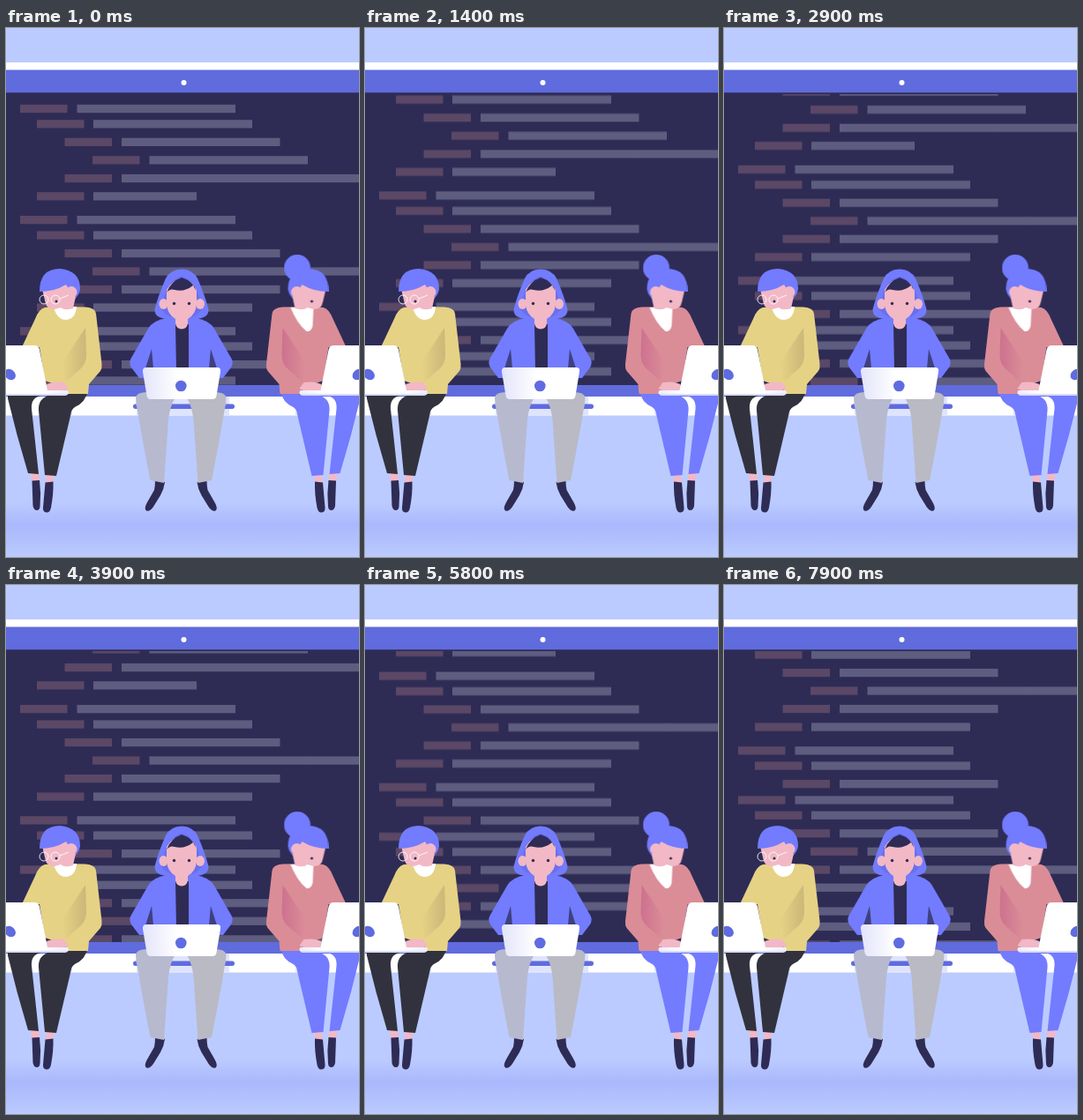
An HTML page without scripts for the animation above (8000 ms loop, 400 by 600 pixels).

```html
<!DOCTYPE html>
<html lang="en">
<head>
<meta charset="utf-8">
<title>Coders</title>
<style>
  html, body { margin: 0; width: 100%; height: 100%; overflow: hidden; background: #bbcbff; }
  svg { display: block; }
  .scroll { animation: scroll 8s steps(80, end) infinite; }
  @keyframes scroll { to { transform: translateY(-158px); } }
  .tag { fill: #5b4766; }
  .line { fill: #5e5d80; }
  .blue { fill: #737bff; }
  .mark { fill: #5f6be0; }
  .navy { fill: #2e2c55; }
  .skin { fill: #f2b8c6; }
  .top { fill: var(--top); }
  .legs { fill: var(--legs); }
  .shade { fill: var(--shade); }
  .left { --top: #e6d285; --legs: #32323f; --shade: url(#olive); }
  .right { --top: #da8d97; --legs: #737bff; --shade: url(#rose); }
</style>
</head>
<body>
<svg width="100%" height="100%" viewBox="0 0 400 600">
  <defs>
    <linearGradient id="floor" x2="0" y2="1">
      <stop offset="0" stop-color="#bbcbff"/>
      <stop offset=".42" stop-color="#aab8fd"/>
      <stop offset="1" stop-color="#bbcbff"/>
    </linearGradient>
    <linearGradient id="lid">
      <stop offset="0" stop-color="#e3e4fa"/>
      <stop offset=".45" stop-color="#fff"/>
    </linearGradient>
    <linearGradient id="sideLid">
      <stop offset=".6" stop-color="#fff"/>
      <stop offset="1" stop-color="#ececfb"/>
    </linearGradient>
    <linearGradient id="olive">
      <stop offset="0" stop-color="#c2ae74" stop-opacity="0"/>
      <stop offset="1" stop-color="#c2ae74" stop-opacity=".75"/>
    </linearGradient>
    <linearGradient id="rose">
      <stop offset="0" stop-color="#c9688c" stop-opacity="0"/>
      <stop offset="1" stop-color="#c9688c" stop-opacity=".75"/>
    </linearGradient>

    <g id="a"><rect class="tag" x="16" width="53.5" height="9.3"/><rect class="line" x="80.5" width="179.5" height="9.3"/></g>
    <g id="b"><rect class="tag" x="35" width="53.5" height="9.3"/><rect class="line" x="99" width="180" height="9.3"/></g>
    <g id="c"><rect class="tag" x="66.5" width="53.5" height="9.3"/><rect class="line" x="131" width="179.5" height="9.3"/></g>
    <g id="d"><rect class="tag" x="98" width="53.5" height="9.3"/><rect class="line" x="162.5" width="179.5" height="9.3"/></g>
    <g id="block">
      <use href="#a"/>
      <use href="#b" y="17.3"/>
      <use href="#c" y="37.8"/>
      <use href="#d" y="58.3"/>
      <use href="#c" y="79"/><rect class="line" x="310" y="79" width="90" height="9.3"/>
      <rect class="tag" x="35" y="99.3" width="53.5" height="9.3"/><rect class="line" x="99" y="99.3" width="117" height="9.3"/>
      <use href="#a" y="126.1"/>
      <use href="#b" y="143.5"/>
      <use href="#c" y="164"/>
      <use href="#d" y="184.5"/><rect class="line" x="341" y="184.5" width="59" height="9.3"/>
      <use href="#c" y="205"/>
      <use href="#b" y="225.5"/>
      <use href="#a" y="252.3"/>
      <use href="#b" y="269.5"/>
      <use href="#c" y="290.1"/>
    </g>

    <!-- seated side figure, facing left -->
    <g id="body">
      <path class="skin" d="M28 503H37L38 515H29ZM46 503H55L53 516H45Z"/>
      <path class="navy" d="M29.500 513.500L38 513Q40 528 38.500 543Q38 547 35 547Q31.500 547 30.500 542ZM44.500 515.500L53.500 514.500Q54 528 51 544Q50 549.500 46 549.500Q41.500 549 42 544Z"/>
      <path class="legs" d="M2 415H60L40 417Q28 419 29 432L37 506L25 505Q12 462 2 420Z"/>
      <path class="legs" d="M93 411Q90 425 78 430Q74 432 73 440L57 508L44 507L37 434Q36 420 50 416L70 410Z"/>
      <path class="top" d="M57 316L44 317Q37 319 33 330L18 362H38L44 400L67 408L69 415H93L94 404L107 389Q109 386 108.500 381L102 324Q101 317 90 316.500Z"/>
      <path class="shade" d="M90 340L64 379L68 401L85 386Q91 380 91 371Z"/>
      <path class="skin" d="M45 405Q52 400 66 402L71 409L62 413H47Z"/>
      <path fill="url(#sideLid)" d="M0 360H33Q37 360.500 38 365L47 411H69Q71 411 71 414Q70 417 66 417H0Z"/>
      <path fill="#d9dcf8" d="M0 415H70L66 417H0Z"/>
      <ellipse class="mark" cx="4.500" cy="393" rx="7" ry="5.500" transform="rotate(40 4.500 393)"/>
    </g>
    <g id="head">
      <path class="skin" d="M41 296L44.500 311Q46 319 55 319L62 317Q66 321 76 318L80 300L72 286H45Z"/>
      <path class="blue" d="M38 299Q38 273 61 273Q84 275 84 296Q83 303 78 307L68 291Q55 299 38 299Z"/>
      <circle class="skin" cx="74" cy="299.500" r="6.500"/>
      <path class="skin" d="M66 297H75L79 306L72 312Z"/>
      <circle class="navy" cx="57" cy="310" r="1.500"/>
      <circle class="navy" cx="42.500" cy="310" r="1.500"/>
    </g>
    <g id="half">
      <path class="navy" d="M169 513L180 515Q179 523 175 530L167 543Q163 549 159 547.500Q156 545 160 538L168 524Q169 519 169 513Z"/>
      <path d="M147 419Q148 413 160 413H192V419Q186 428 184 444L179 516L163.500 513Q155 470 149 434Q147 427 147 419Z"/>
    </g>
  </defs>

  <rect width="400" height="600" fill="#bbcbff"/>
  <rect y="538" width="400" height="62" fill="url(#floor)"/>

  <!-- big monitor -->
  <rect y="39" width="400" height="9" fill="#fff"/>
  <rect y="47.500" width="400" height="370.500" fill="#606bdd"/>
  <circle cx="201.500" cy="62" r="3" fill="#fff"/>
  <rect y="73.300" width="400" height="331.700" class="navy"/>
  <svg y="75" width="400" height="329.500" viewBox="0 75 400 329.500">
    <g class="scroll">
      <use href="#block" y="86.900"/>
      <use href="#block" y="395.300"/>
    </g>
  </svg>
  <rect y="418" width="400" height="21.500" fill="#fff"/>
  <path fill="#dfe4fd" d="M148 418H253V439.500H148ZM65 425H75V439.500H65ZM328 425H338V439.500H328Z"/>

  <g class="left">
    <use href="#body"/>
    <path fill="#fff" d="M54 317Q58 331 68 331Q79 330 80 316Z"/>
    <use href="#head"/>
    <g fill="none" stroke="#fff" stroke-opacity=".85">
      <circle cx="43" cy="308" r="5"/>
      <circle cx="56" cy="308" r="5"/>
      <path d="M61 307L71 303"/>
    </g>
  </g>

  <g class="right" transform="matrix(-1 0 0 1 403.500 0)">
    <use href="#body"/>
    <path fill="#fff" d="M55 317L56 338Q58 345 63 344Q74 335 81 317Z"/>
    <circle class="blue" cx="73.500" cy="272" r="15"/>
    <use href="#head"/>
  </g>

  <!-- hooded coder -->
  <rect class="mark" x="144" y="426.500" width="115" height="5.500" rx="2.750"/>
  <use href="#half" fill="#b7b9ce"/>
  <use href="#half" fill="#b9bac4" transform="matrix(-1 0 0 1 396.500 0)"/>
  <path class="blue" d="M183 329Q167 331 161 341L141.500 375Q139 380 142 385L151 397H246L255 385Q258 380 255.500 375L236 341Q230 331 214 329Z"/>
  <path class="navy" d="M165 364L167 386H158ZM232 364L230 386H239Z" opacity=".75"/>
  <path class="navy" d="M192 336H207V388H193Z"/>
  <path class="blue" d="M199 273.500Q186 274 181 284Q173 302 168.500 319Q168 326 175 328.500Q182 331 190 331H208Q216 331 223 328.500Q230 326 229.500 319Q225 302 217 284Q212 274 199 273.500Z"/>
  <path fill="#6970ee" d="M199 282C186 284 179 300 176 319Q182 328 192 329H206Q216 328 222 319C219 300 212 284 199 282Z"/>
  <ellipse class="skin" cx="178.500" cy="313" rx="5" ry="6"/>
  <ellipse class="skin" cx="220" cy="313" rx="5" ry="6"/>
  <path class="skin" d="M182 297Q189 285 199 285Q210 286 216 297V313Q215 325 206 330V335Q205 341.500 199 341.500Q193 341 192 335V330Q183 325 182 313Z"/>
  <path class="navy" d="M182 300Q187 287 199 283Q212 287 216 299L212 292Q202 300 191 297Q186 295 182 300Z"/>
  <circle class="navy" cx="190.500" cy="312.500" r="1.700"/>
  <circle class="navy" cx="207.500" cy="312.500" r="1.700"/>
  <path fill="url(#lid)" d="M159 385H239Q244 385 243 390L238.500 417Q238 421 234 421H164Q160 421 159.500 417L155 390Q154.500 385 159 385Z"/>
  <circle class="mark" cx="198.300" cy="406" r="6.300"/>
</svg>
</body>
</html>
```
